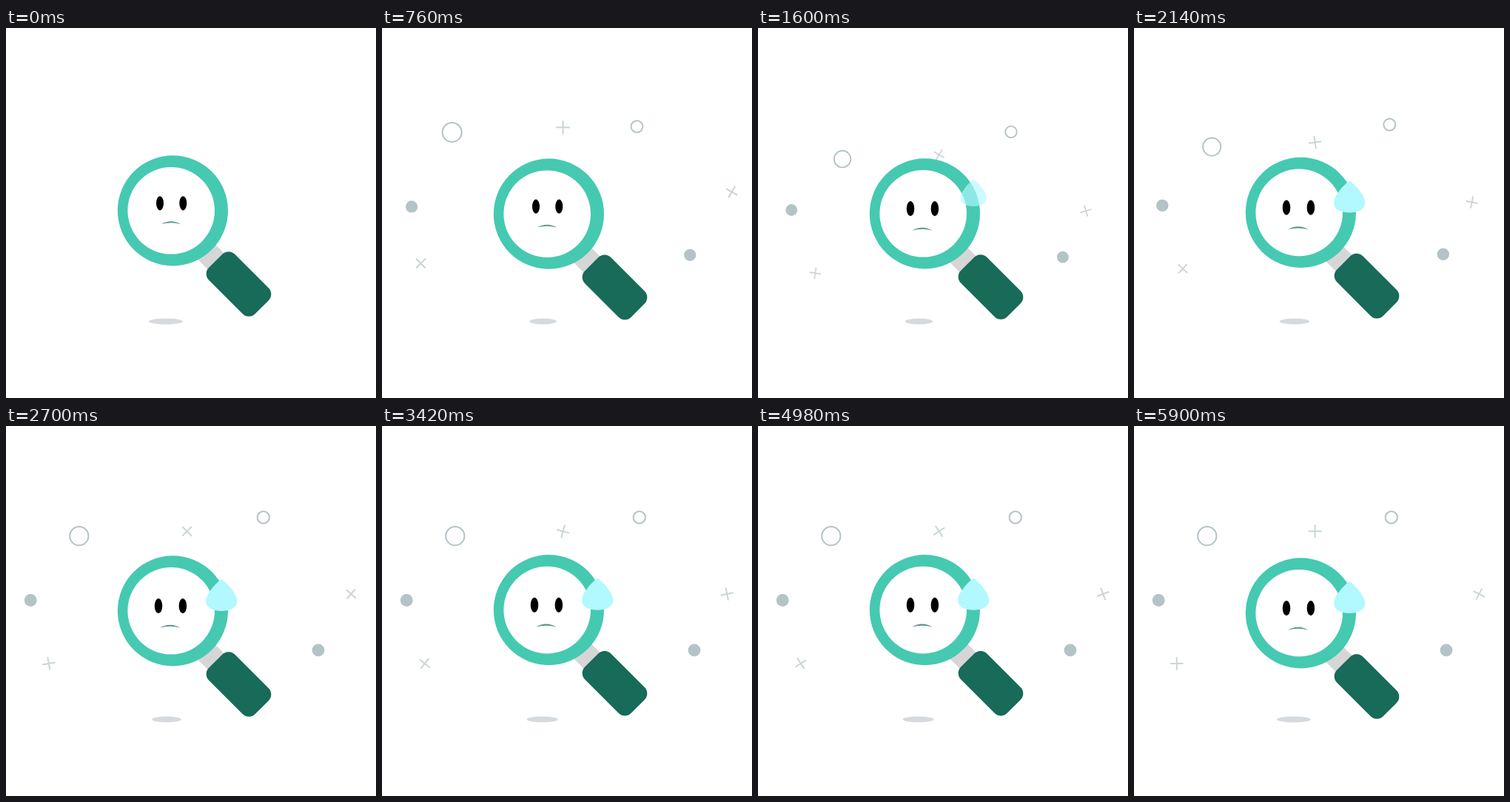
Recreate the animation shown at these times as an HTML page. Size 500 by 500 pixels, loop 5.92 s.

```html
<!DOCTYPE html>
<html lang="en">
<head>
<meta charset="utf-8">
<title>Worried magnifier</title>
<style>
  html, body { margin: 0; width: 100%; height: 100%; overflow: hidden; background: #fff; }
  svg { display: block; width: 100%; height: 100%; }
  .ring { fill: none; stroke: #b3c3c7; stroke-width: 2; }
  .dot { fill: #b3c3c6; }
  .cross { fill: none; stroke: #cbd5d6; stroke-width: 2; }
</style>
</head>
<body>
<svg viewBox="0 0 500 500">
  <ellipse id="shadow" cx="216" cy="396.5" rx="23" ry="4" fill="#d5dade"/>
  <g id="wide">
    <circle class="ring" cx="98.8" cy="148.7" r="12.6"/>
    <path id="plus" class="cross" d="M-9 0H9M0-9V9"/>
    <path id="left" class="cross" d="M-8.8 0H8.8M0-8.8V8.8"/>
    <path id="right" class="cross" d="M-8.6 0H8.6M0-8.6V8.6"/>
  </g>
  <g id="near">
    <circle class="ring" cx="347.8" cy="123.5" r="8.2"/>
    <circle class="dot" cx="33.2" cy="235.5" r="8.4"/>
    <circle class="dot" cx="422" cy="303" r="8.4"/>
  </g>
  <g id="glass">
    <g transform="translate(314.5 346) rotate(45)">
      <rect x="-80" y="-15.5" width="50" height="31" fill="#d6d6d6"/>
      <rect x="-44.2" y="-24.8" width="88.4" height="49.6" rx="12" fill="#186a59"/>
    </g>
    <circle cx="225.4" cy="246.8" r="74.6" fill="#46c9b1"/>
    <circle cx="223.2" cy="246.8" r="58.8" fill="#fff"/>
    <g id="face">
      <ellipse cx="208" cy="236.8" rx="5" ry="9.6"/>
      <ellipse cx="239.3" cy="236.8" rx="5" ry="9.6"/>
      <path d="M210 265Q223 257.5 236 265Q223 261.5 210 265Z" fill="#5a978d"/>
    </g>
    <path id="drop" fill="#b1f8ff"
      d="M291.2 204C299 209 312.2 224 312.2 234C312.2 243 302 247 291.2 247S270.2 243 270.2 234C270.2 224 283.4 209 291.2 204Z"/>
  </g>
</svg>
<script>
const LOOP = 5920, BEAT = 600, BOB_END = 5400;
const el = id => document.getElementById(id);
const [shadow, wide, near, glass, face, drop, plus, left, right] =
  ['shadow', 'wide', 'near', 'glass', 'face', 'drop', 'plus', 'left', 'right'].map(el);

const linear = p => p;
const smooth = p => p * p * (3 - 2 * p);

// Value at time t from [time, value] steps.
function track(steps, t, ease = linear) {
  if (t <= steps[0][0]) return steps[0][1];
  for (let i = 1; i < steps.length; i++) {
    const [t0, a] = steps[i - 1], [t1, b] = steps[i];
    if (t < t1) return a + (b - a) * ease((t - t0) / (t1 - t0));
  }
  return steps[steps.length - 1][1];
}

// Triangle wave: 0 at the top of the bob, 1 at the bottom.
const bob = t => 1 - Math.abs(1 - (t / BEAT) % 2);

const burst = (peak, dip) => [[90, 0], [955, peak], [1430, dip], [2680, 1]];
const WIDE = burst(1.18, 0.89);
const NEAR = burst(1.11, 0.94);
const FADE = [[380, 0], [560, 1]];
const PLUS_SPIN = [[0, -198], [760, -90], [1600, 30], [2700, 135], [3420, 195], [4280, 270], [BOB_END, 360]];
const LEFT_SPIN = [[0, 0], [760, 45], [1600, 98], [2700, 170], [3420, 218], [4280, 272], [BOB_END, 360]];

const set = (node, value) => node.setAttribute('transform', value);
const scaleAt = (x, y, k) => `translate(${x} ${y}) scale(${k}) translate(${-x} ${-y})`;
const spin = (node, x, y, angle) => set(node, `translate(${x} ${y}) rotate(${angle})`);

function draw(t) {
  const low = t < BOB_END ? bob(t) : 1;
  set(glass, `translate(0 ${6 * low})`);

  const narrow = t < BOB_END ? low : track([[BOB_END, 1], [5900, 0]], t);
  const k = 1 - 0.28 * narrow;
  set(shadow, `translate(${223.7 * (1 - k)} 0) scale(${k} 1)`);

  const fade = track(FADE, t);
  for (const [node, steps] of [[wide, WIDE], [near, NEAR]]) {
    set(node, scaleAt(245, 420, track(steps, t, smooth)));
    node.setAttribute('opacity', fade);
  }
  spin(plus, 244.6, 142.3, track(PLUS_SPIN, t));
  spin(left, 57.8, 321, track(LEFT_SPIN, t));
  spin(right, 466.3, 227, 30 + 0.052 * (t - 760));

  const worry = track([[800, 0], [1400, 1]], t);
  set(face, `translate(${-1.2 * worry} ${3.6 * worry}) ${scaleAt(223.5, 243, 1 + 0.05 * worry)}`);

  const grow = track([[1200, 0], [1800, 1]], t);
  set(drop, scaleAt(291.2, 185, 0.5 + 0.5 * grow));
  drop.setAttribute('opacity', grow);
}

const start = performance.now();
function tick() {
  draw((performance.now() - start) % LOOP);
  requestAnimationFrame(tick);
}
draw(0);
requestAnimationFrame(tick);
</script>
</body>
</html>
```
